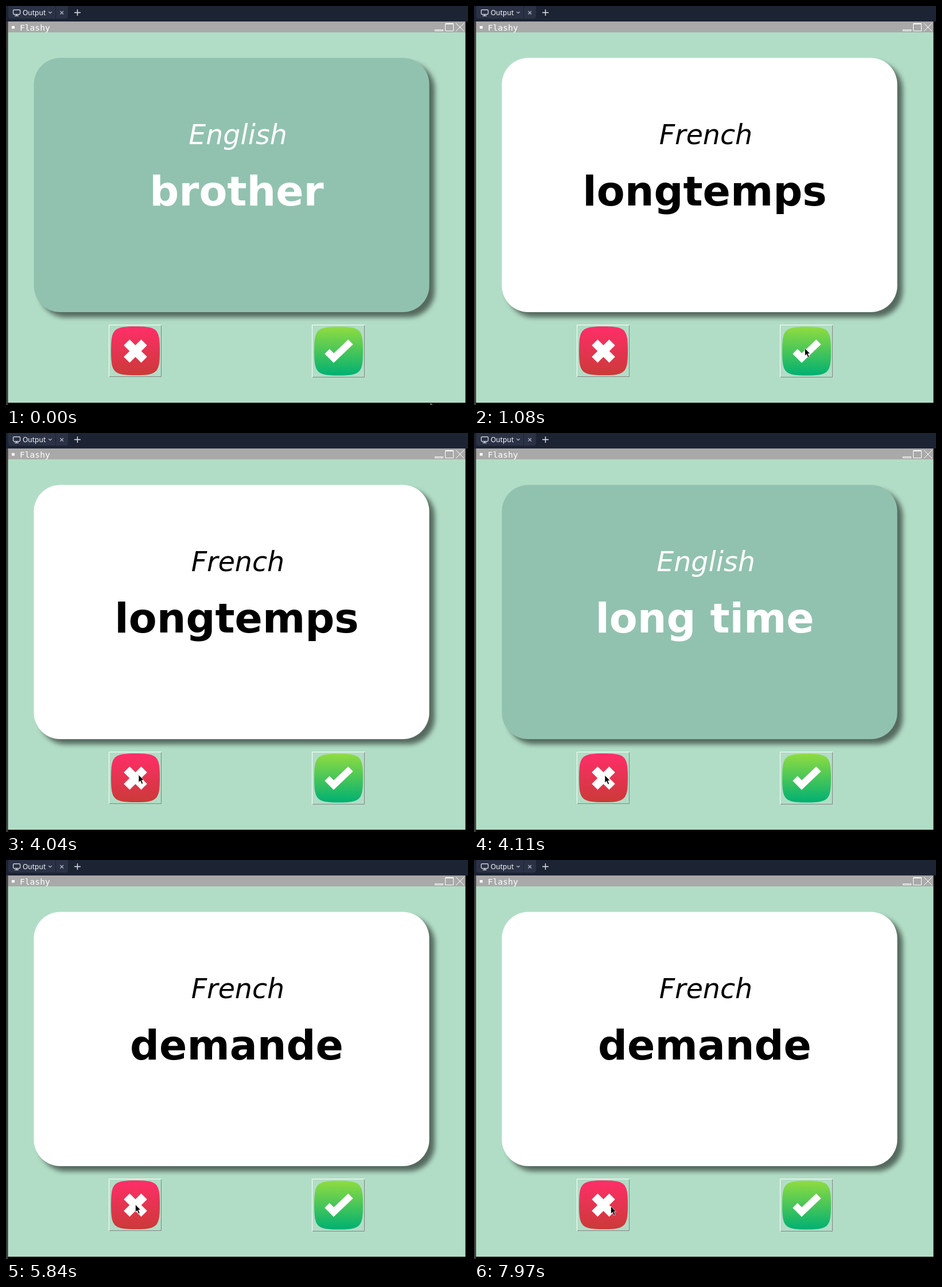
Write an HTML page that moves like this. It is 805x696 px and loops after 8 s.

```html
<!DOCTYPE html>
<html lang="en">
<head>
<meta charset="utf-8">
<title>Flash cards</title>
<style>
  html, body { margin: 0; width: 100%; height: 100%; overflow: hidden; background: #000; }
  svg { display: block; }
  .card { font-family: "DejaVu Sans", sans-serif; text-anchor: middle; }
  #language { font-size: 47.5px; font-style: italic; }
  #word { font-size: 71.3px; font-weight: bold; }
</style>
</head>
<body>
<svg width="805" height="696" viewBox="0 0 805 696">
  <defs>
    <linearGradient id="red" x2="0" y2="1">
      <stop stop-color="#ff2e69"/><stop offset="1" stop-color="#cb3a38"/>
    </linearGradient>
    <linearGradient id="green" x2="0" y2="1">
      <stop stop-color="#90dc40"/><stop offset="1" stop-color="#00b072"/>
    </linearGradient>
    <filter id="blur" x="-10%" y="-10%" width="120%" height="120%">
      <feGaussianBlur stdDeviation="4.2"/>
    </filter>
    <path id="squircle" d="M-42.5 0C-42.5-38-38-42.5 0-42.5S42.5-38 42.5 0 38 42.5 0 42.5-42.5 38-42.5 0Z"/>
  </defs>

  <!-- tab bar -->
  <rect width="805" height="696"/>
  <rect width="805" height="27" fill="#1c2333"/>
  <path d="M4 0H108V18Q108 22 104 22H8Q4 22 4 18Z" fill="#2b3245"/>
  <path d="M86.5 0V22" stroke="#1c2333"/>
  <g fill="none" stroke="#e4e8ee" stroke-width="1.2">
    <rect x="12.6" y="6.6" width="12" height="8" rx="1.5"/>
    <path d="M18.6 14.6V17M15 17.2H22"/>
    <path d="M74.3 10L77 12.7 79.7 10M94.5 9L100 14.5M100 9L94.5 14.5" stroke="#b5bbc7"/>
    <path d="M119 11.5H130M124.5 6V17" stroke-width="1.4"/>
  </g>
  <text x="29" y="15.5" font-family="Noto Sans, sans-serif" font-size="12" fill="#f5f9fc">Output</text>

  <!-- window -->
  <rect y="27" width="3.5" height="669" fill="#3b3b3b"/>
  <rect x="3.5" y="27" width="797" height="19" fill="#a9a9a9"/>
  <rect x="3.5" y="46" width="797" height="646" fill="#b1ddc6"/>
  <rect x="10" y="35" width="5" height="4.5" fill="#fff"/>
  <text x="24" y="42.5" font-family="DejaVu Sans Mono, monospace" font-size="14.6" fill="#fff">Flashy</text>
  <g fill="none" stroke="#fff">
    <path d="M747.5 41.5H761.5V43.5H747.5ZM766 30.5H779.5V43.5H765.5V30.5M766 31.5H779M784 30L798 44M798 30L784 44"/>
  </g>

  <!-- card -->
  <rect x="58" y="99" width="689" height="444" rx="46" opacity=".52" filter="url(#blur)"/>
  <rect id="face" x="48.5" y="90.5" width="689" height="443.5" rx="46"/>
  <g id="label" class="card">
    <text id="language" x="404" y="240.5"/>
    <text id="word" x="402" y="348"/>
  </g>

  <!-- buttons -->
  <g id="wrong" fill="none">
    <path class="light" d="M179.5 647V556.5H271"/>
    <path class="dark" d="M180 646.5H270.5V557"/>
    <g class="icon">
      <use href="#squircle" x="225.5" y="601.5" fill="url(#red)"/>
      <path d="M210.3 586.8L240.7 617.2M240.7 586.8L210.3 617.2" stroke="#fff" stroke-width="14.5"/>
    </g>
  </g>
  <g id="right" fill="none">
    <path class="light" d="M533.5 648V556.5H625"/>
    <path class="dark" d="M534 647.5H624.5V557"/>
    <g class="icon">
      <use href="#squircle" x="579.5" y="602" fill="url(#green)"/>
      <path d="M559.5 602.5L571 614 600.5 586" stroke="#fff" stroke-width="12"/>
    </g>
  </g>

  <path id="cursor" d="M0 0V13.2L3 10.4 5.4 16 7.7 15 5.3 9.5H9.2Z" stroke="#fff" stroke-width=".7"/>
</svg>
<script>
const LOOP = 8000;
const $ = id => document.getElementById(id);

// Each card appears at its start time: [start, language, word]
const cards = [
  [0, "English", "brother"],
  [1080, "French", "longtemps"],
  [4110, "English", "long time"],
  [5840, "French", "demande"],
];

// Pointer stops: [time, x, y]
const stops = [
  [0, 740, 693], [70, 740, 693], [870, 576.5, 597],
  [2150, 576.5, 597], [2500, 337, 572.5],
  [3600, 337, 572.5], [4090, 228, 597], [4380, 226, 599.5],
  [5240, 226, 599.5], [5310, 225.5, 601],
  [7600, 225.5, 601], [7970, 238.5, 604], [LOOP, 238.5, 604],
];

function pointerAt(t) {
  const i = stops.findIndex(stop => stop[0] > t);
  const [t0, x0, y0] = stops[i - 1], [t1, x1, y1] = stops[i];
  const p = (t - t0) / (t1 - t0), eased = p * p * (3 - 2 * p);
  return [x0 + (x1 - x0) * eased, y0 + (y1 - y0) * eased];
}

function setPressed(id, pressed) {
  const part = name => $(id).querySelector(name);
  part(".light").setAttribute("stroke", pressed ? "#858585" : "#fff");
  part(".dark").setAttribute("stroke", pressed ? "#fff" : "#858585");
  part(".icon").setAttribute("transform", pressed ? "translate(1 1)" : "");
}

function draw(now) {
  const t = now % LOOP;
  const [, language, word] = cards.findLast(card => card[0] <= t);
  const english = language === "English";
  $("face").setAttribute("fill", english ? "#91c2af" : "#fff");
  $("label").setAttribute("fill", english ? "#fff" : "#000");
  $("language").textContent = language;
  $("word").textContent = word;
  setPressed("right", t >= 940 && t < 1080);
  setPressed("wrong", t >= 5700 && t < 5840);
  $("cursor").setAttribute("transform", `translate(${pointerAt(t)})`);
}

const start = performance.now();
function tick() {
  draw(performance.now() - start);
  requestAnimationFrame(tick);
}
tick();
</script>
</body>
</html>
```
